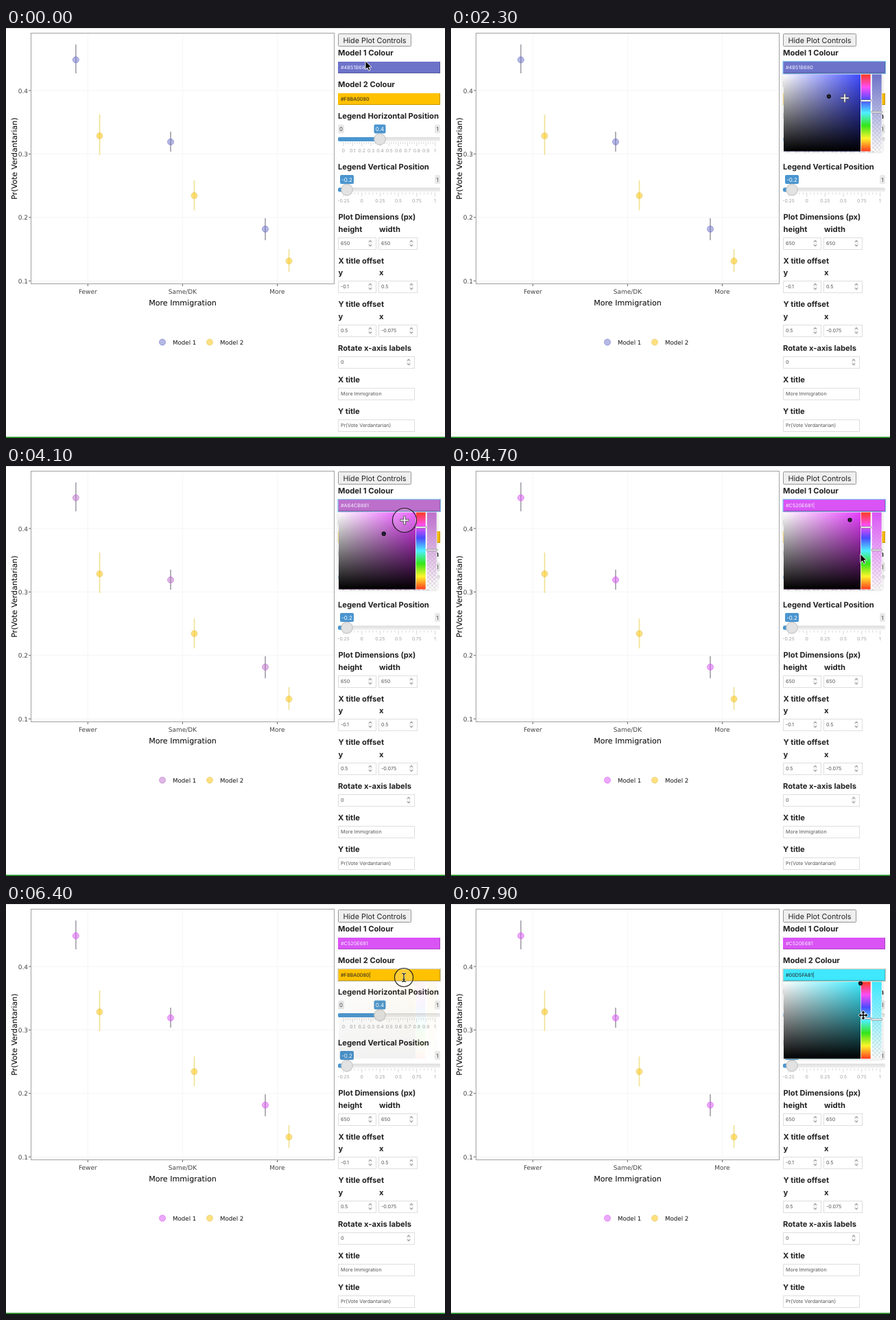
Animation of 640 by 597 pixels, one loop 8000 ms. Source, as an HTML page:

```html
<!DOCTYPE html>
<html lang="en">
<head>
<meta charset="utf-8">
<title>Plot controls</title>
<style>
  html, body { margin: 0; width: 100%; height: 100%; overflow: hidden; background: #fff; }
  svg { display: block; width: 640px; height: 597px; }
  text { font-family: Inter, "Liberation Sans", sans-serif; white-space: pre; text-rendering: geometricPrecision; }
  .head { font-size: 11.2px; font-weight: 700; fill: #222; }
  .value { font-size: 7.2px; fill: #555; }
  .scale { font-size: 6.8px; fill: #a2a2a2; text-anchor: middle; }
  .tag { font-size: 8px; fill: #444; text-anchor: middle; }
  .axis { font: 9px "DejaVu Sans", sans-serif; fill: #444; }
  .title { font: 11.1px "DejaVu Sans", sans-serif; fill: #000; text-anchor: middle; }
  .legend { font: 8.7px "DejaVu Sans", sans-serif; fill: #111; }
  .mid { text-anchor: middle; }
  .end { text-anchor: end; }
  .picker { filter: drop-shadow(0 0 2px rgba(0, 0, 0, .2)); }
</style>
</head>
<body>
<svg id="stage" viewBox="0 0 640 597" xmlns="http://www.w3.org/2000/svg"></svg>
<script>
const LOOP = 8000, STEP = 100;
const PARTY = 'Verdantarian';

// ---- drawing helpers ----
const text = (x, y, cls, s, more = '') => `<text x="${x}" y="${y}" class="${cls}" ${more}>${s}</text>`;
const rect = (x, y, w, h, fill, more = '') => `<rect x="${x}" y="${y}" width="${w}" height="${h}" fill="${fill}" ${more}/>`;
const path = (d, stroke, w = 1, more = '') => `<path d="${d}" fill="none" stroke="${stroke}" stroke-width="${w}" ${more}/>`;
const stops = list => list.map((c, i) => `<stop offset="${i / (list.length - 1)}" stop-color="${c}"/>`).join('');

const defs = `<defs>
  <linearGradient id="white"><stop stop-color="#fff"/><stop offset="1" stop-color="#fff" stop-opacity="0"/></linearGradient>
  <linearGradient id="black" x2="0" y2="1"><stop stop-opacity="0"/><stop offset="1"/></linearGradient>
  <linearGradient id="hues" x2="0" y2="1">${stops(['#ff3a20', '#ff4df5', '#4a4aff', '#4df0ff', '#35e51a', '#fff52a', '#ff3a20'])}</linearGradient>
  <linearGradient id="track" x2="0" y2="1">${stops(['#dcdcdc', '#f2f2f2'])}</linearGradient>
  <pattern id="checks" width="6" height="6" patternUnits="userSpaceOnUse">
    ${rect(0, 0, 6, 6, '#fff')}${rect(0, 0, 3, 3, '#e4e4e4')}${rect(3, 3, 3, 3, '#e4e4e4')}
  </pattern></defs>`;

// ---- plot ----
const points = [
  [[101.8, 46.3, 24, 66], [240, 165.8, 151, 180], [378, 292.8, 277, 309]],
  [[136.5, 157, 126, 185], [274.5, 244, 222, 265.5], [412.5, 339.3, 322, 355]]
];

function series(i) {
  const bar = i ? '#f1e39a' : '#aaa7b0';
  const edge = i ? '#d9c668' : 'currentColor';
  const dot = (x, y) => `<circle cx="${x}" cy="${y}" r="4.5" fill="currentColor" fill-opacity=".5" stroke="${edge}" stroke-opacity=".6"/>`;
  const key = i ? 297 : 228;
  return `<g id="series${i}">` +
    points[i].map(([x, y, a, b]) => path(`M${x} ${a}V${b}`, bar, 1.8) + dot(x, y)).join('') +
    dot(key, 457.5) + '</g>' + text(key + 15, 461, 'legend', `Model ${i + 1}`);
}

function plot() {
  let s = '';
  ['0.4', '0.3', '0.2', '0.1'].forEach((v, i) => {
    const y = 91 + i * 92.4;
    s += path(`M37 ${y}H478`, '#f4f4f4') + path(`M33 ${y}H36`, '#666') + text(32, y + 3.5, 'axis end', v);
  });
  ['Fewer', 'Same/DK', 'More'].forEach((v, i) => {
    const x = 119.3 + i * 138.1;
    s += path(`M${x} 8V372`, '#f6f6f6') + path(`M${x} 373V376`, '#666') + text(x, 386.6, 'axis mid', v);
  });
  return s + rect(36.5, 7.5, 442, 365, 'none', 'stroke="#a0a0a0"') +
    text(257.5, 404, 'title', 'More Immigration') +
    text(0, 0, 'title', `Pr(Vote ${PARTY})`, 'transform="translate(15.6 190) rotate(-90)"') +
    series(0) + series(1);
}

// ---- control panel ----
const head = (x, y, s) => text(x, y + 3.8, 'head', s);

const field = (i, y) => `<g id="field${i}">
  ${rect(484, y - 8.5, 149, 17, 'currentColor')}
  ${path(`M484.5 ${y + 8}H632.5V${y - 8.5}`, '#000', 1, 'opacity=".22"')}
  <rect class="glow" x="484" y="${y - 9}" width="149.5" height="18" fill="none" stroke="${i ? '#d2cfc4' : '#84c4ee'}" stroke-width="1.2"/>
  ${text(488, y + 2.8, 'value', '', `style="fill:${i ? '#222' : '#f4f2ff'};font-size:7.3px"`)}</g>`;

function tag(x, y, s, w, on) {
  return rect(x - w / 2, y - 6.5, w, 13, on ? '#4a95cf' : '#e9e9e9', 'rx="2"') +
    text(x, y + 3, 'tag', s, on ? 'style="fill:#fff"' : '');
}

function slider(y, knob, value, w, labels, minor) {
  const x0 = 492, span = 133.5, n = labels.length - 1;
  let s = rect(484, y - 3, 149, 6, 'url(#track)', 'rx="2"') + rect(484, y - 3, knob - 484, 6, '#4a95cf', 'rx="2"');
  for (let i = 0; i <= n * minor; i++) {
    const x = x0 + span * i / (n * minor);
    s += path(`M${x} ${y + 4}v${i % minor ? 3 : 6}`, '#c8c8c8', .7);
  }
  labels.forEach((v, i) => s += text(x0 + span * i / n, y + 18.8, 'scale', v));
  return s + tag(629, y - 15, '1', 8, false) + tag(knob, y - 15, value, w, true) +
    `<circle cx="${knob}" cy="${y}" r="8.3" fill="#e2e2e2" stroke="#bdbdbd"/>`;
}

function input(x, y, w, value, spin) {
  let s = rect(x + .5, y - 8, w, 17, '#fff', 'stroke="#dedede"') + text(x + 4, y + 2.8, 'value', value);
  if (spin) {
    const a = x + w - 8;
    s += rect(a - 3, y - 6, 6, 12, '#f4f4f4', 'rx="2"') +
      path(`M${a - 1.8} ${y - 2}l1.8 -2 1.8 2M${a - 1.8} ${y + 2}l1.8 2 1.8 -2`, '#555', .9);
  }
  return s;
}

function panel() {
  const tenths = Array.from({ length: 11 }, (_, i) => String(i / 10));
  const pair = (y, a, b) => input(484, y, 55, a, true) + input(543, y, 56, b, true);
  return rect(484.5, 8.5, 106, 18, '#efefef', 'stroke="#959595" rx="1"') +
    text(537.5, 21.5, 'mid', 'Hide Plot Controls', 'font-size="10.8" fill="#222"') +
    head(484, 36.5, 'Model 1 Colour') + field(0, 57.5) +
    head(484, 82.5, 'Model 2 Colour') + field(1, 103.5) +
    head(484, 128.5, 'Legend Horizontal Position') + tag(488.5, 147, '0', 9, false) +
    slider(162, 545, '0.4', 17, tenths, 4) +
    head(484, 202, 'Legend Vertical Position') +
    slider(235.5, 497, '-0.2', 20, ['-0.25', '0', '0.25', '0.5', '0.75', '1'], 5) +
    head(484.5, 275, 'Plot Dimensions (px)') + head(484.5, 293, 'height') + head(544, 293, 'width') +
    pair(313.5, '650', '650') +
    head(484.5, 339, 'X title offset') + head(484.5, 356, 'y') + head(544, 356, 'x') + pair(376.5, '-0.1', '0.5') +
    head(484.5, 402.5, 'Y title offset') + head(484.5, 420, 'y') + head(544, 420, 'x') + pair(440.5, '0.5', '-0.075') +
    head(484, 466.5, 'Rotate x-axis labels') + input(484, 486.5, 111, '0', true) +
    head(484, 512, 'X title') + input(484, 532.5, 111, 'More Immigration') +
    head(484, 558, 'Y title') + input(484, 578.5, 111, `Pr(Vote ${PARTY})`);
}

const SIZE = 112;
const handle = (x, y, cls) => rect(x, y - 1.2, 15.5, 2.4, '#fff', `class="${cls}" stroke="#555" stroke-width=".5"`);

const picker = (i, y) => `<g id="picker${i}" class="picker" transform="translate(485 ${y})">
  <linearGradient id="alpha${i}" x2="0" y2="1"><stop stop-color="currentColor"/><stop offset="1" stop-color="currentColor" stop-opacity="0"/></linearGradient>
  ${rect(-.5, -.5, 144, SIZE + 1, '#fff')}
  ${rect(0, 0, SIZE, SIZE, '#fff', 'class="pure"')}${rect(0, 0, SIZE, SIZE, 'url(#white)')}${rect(0, 0, SIZE, SIZE, 'url(#black)')}
  ${rect(112.7, 0, 14, SIZE, 'url(#hues)')}
  ${rect(128.7, 0, 14, SIZE, 'url(#checks)')}${rect(128.7, 0, 14, SIZE, `url(#alpha${i})`)}
  ${handle(112, 0, 'hue')}${handle(128, SIZE / 2 - 1, '')}
  <circle class="mark" r="2.4" fill="#2a2a3c" stroke="#0c0c12" stroke-width="1.4"/></g>`;

// ---- pointer shapes, hotspot at the origin ----
const arms = (a, c, w) => path(`M${-a} 0H${a}M0 ${-a}V${a}`, c, w);
const ibeam = 'M-3 -6Q0 -6 0 -4V4Q0 6 -3 6M3 -6Q0 -6 0 -4M0 4Q0 6 3 6M-1.8 2.5H1.8';
const tips = 'M-6.5 0l3 -2.6v5.2zM6.5 0l-3 -2.6v5.2zM0 -6.5l-2.6 3h5.2zM0 6.5l-2.6 -3h5.2z';
const shapes = {
  arrow: '<path d="M0 0V12.5L2.9 9.8 4.9 14.2 7 13.3 5.1 9H9z" fill="#000" stroke="#fff" stroke-width=".9"/>',
  beam: path(ibeam, '#fff', 2.4, 'opacity=".7"') + path(ibeam, '#111', 1.2),
  cross: arms(6.5, '#555', 3.4) + arms(5.8, '#fff', 1.6),
  move: arms(5, '#fff', 3.4) + `<path d="${tips}" fill="#000" stroke="#fff" stroke-width="1.2" paint-order="stroke"/>` + arms(4.5, '#000', 1.5)
};
const pointer = '<circle id="ring" fill="#fff" fill-opacity=".2" stroke="#111" stroke-opacity=".9" stroke-width="1.2"/><g id="pointer">' +
  Object.entries(shapes).map(([k, v]) => `<g id="${k}">${v}</g>`).join('') + '</g>';

const stage = document.getElementById('stage');
stage.innerHTML = defs + rect(0, 0, 640, 597, '#fff') + rect(0, 0, 640, 1, '#e4e4e4') +
  plot() + panel() + picker(0, 67.5) + picker(1, 113.3) +
  rect(0, 595.3, 640, 1.7, '#1c8a1c') + pointer;
const $ = s => stage.querySelector(s);

// ---- motion ----
const moves = [
  [0, 524, 48], [500, 524, 50], [1000, 524, 61], [1400, 524, 62], [1900, 525, 63], [2300, 574, 102],
  [2800, 605, 105], [2900, 605, 105], [3400, 605, 89], [3600, 605, 89], [4000, 581, 79], [4400, 581, 79],
  [5100, 621.5, 204], [5400, 621.5, 204], [6200, 580, 107], [6600, 580, 107], [7100, 604, 211],
  [7300, 604, 210], [7900, 601, 162]
];
const kinds = [[0, 'arrow'], [800, 'beam'], [2000, 'cross'], [2700, 'move'], [3700, 'cross'], [4700, 'arrow'], [6100, 'beam'], [6800, 'cross'], [7000, 'move']];
const presses = [1600, 2900, 4000, 5200, 6400, 7200];
const fades = [
  [[1700, 0], [1900, 1], [5200, 1], [5400, 0]],
  [[6390, 0], [6600, 1]]
];
const hues = [[[2900, 236.6], [3400, 290]], [[7200, 45], [7900, 188.9]]];

const last = (list, t) => list.filter(k => k[0] <= t).pop();

function track(keys, t, col = 1, ease = true) {
  const i = keys.findIndex(k => k[0] > t);
  if (i === 0) return keys[0][col];
  if (i < 0) return keys[keys.length - 1][col];
  const a = keys[i - 1], b = keys[i];
  let p = (t - a[0]) / (b[0] - a[0]);
  if (ease) p = p * p * (3 - 2 * p);
  return a[col] + (b[col] - a[col]) * p;
}

function colour(i, t) {
  const h = track(hues[i], t);
  if (i) return [h, 1, t < 7200 ? .9725 : .98];
  if (t < 2900) return [h, .588, .7137];
  return t < 4200 ? [h, .587, .7216] : [h, .861, .902];
}

const rgb = ([h, s, v]) => [5, 3, 1].map(n => {
  const k = (n + h / 60) % 6;
  return Math.round(255 * v * (1 - s * Math.max(0, Math.min(k, 4 - k, 1))));
});
const hex = c => '#' + c.map(n => n.toString(16).padStart(2, '0')).join('').toUpperCase();
// Screen tint: a little brighter, and bluer colours come out paler.
const shown = c => `rgb(${c.map(n => Math.min(255, Math.round(n * 1.04 + (255 - n) * .25 * c[2] / 255)))})`;

function drawControl(i, t) {
  const hsv = colour(i, t), c = rgb(hsv), [h, s, v] = hsv;
  const box = $(`#field${i}`), pick = $(`#picker${i}`);
  const focus = i ? t >= 6400 : t >= 1600 && t < 5200;
  const touched = t >= hues[i][0][0];
  const caret = focus && t % 1000 >= 400 ? '|' : '';
  box.style.color = pick.style.color = shown(c);
  box.querySelector('text').textContent = hex(c) + (touched ? '81' : '80') + caret;
  box.querySelector('.glow').style.opacity = focus ? 1 : 0;

  const alpha = track(fades[i], t, 1, false);
  pick.style.opacity = alpha;
  pick.style.display = alpha ? '' : 'none';
  pick.querySelector('.pure').style.fill = shown(rgb([h, 1, 1]));
  pick.querySelector('.hue').setAttribute('y', (1 - h / 360) * SIZE - 1.2);
  const mark = pick.querySelector('.mark');
  mark.setAttribute('cx', s * SIZE);
  mark.setAttribute('cy', (1 - v) * SIZE);
}

function draw(t) {
  drawControl(0, t);
  drawControl(1, t);
  const applied = t < 3500 ? 0 : t < 4300 ? 4000 : LOOP;
  $('#series0').style.color = shown(rgb(colour(0, applied)));
  $('#series1').style.color = shown(rgb(colour(1, 0)));

  const x = track(moves, t, 1), y = track(moves, t, 2), kind = last(kinds, t)[1];
  $('#pointer').setAttribute('transform', `translate(${x} ${y})`);
  for (const k in shapes) $('#' + k).style.display = k === kind ? '' : 'none';

  const press = presses.find(p => t >= p && t < p + 300);
  const ring = $('#ring');
  ring.style.display = press === undefined ? 'none' : '';
  ring.setAttribute('cx', x);
  ring.setAttribute('cy', y);
  ring.setAttribute('r', t === press ? 13.5 : 17.5);
}

const start = performance.now();
function tick() {
  const t = (performance.now() - start) % LOOP;
  draw(Math.floor(t / STEP) * STEP);
  requestAnimationFrame(tick);
}
tick();
</script>
</body>
</html>
```
